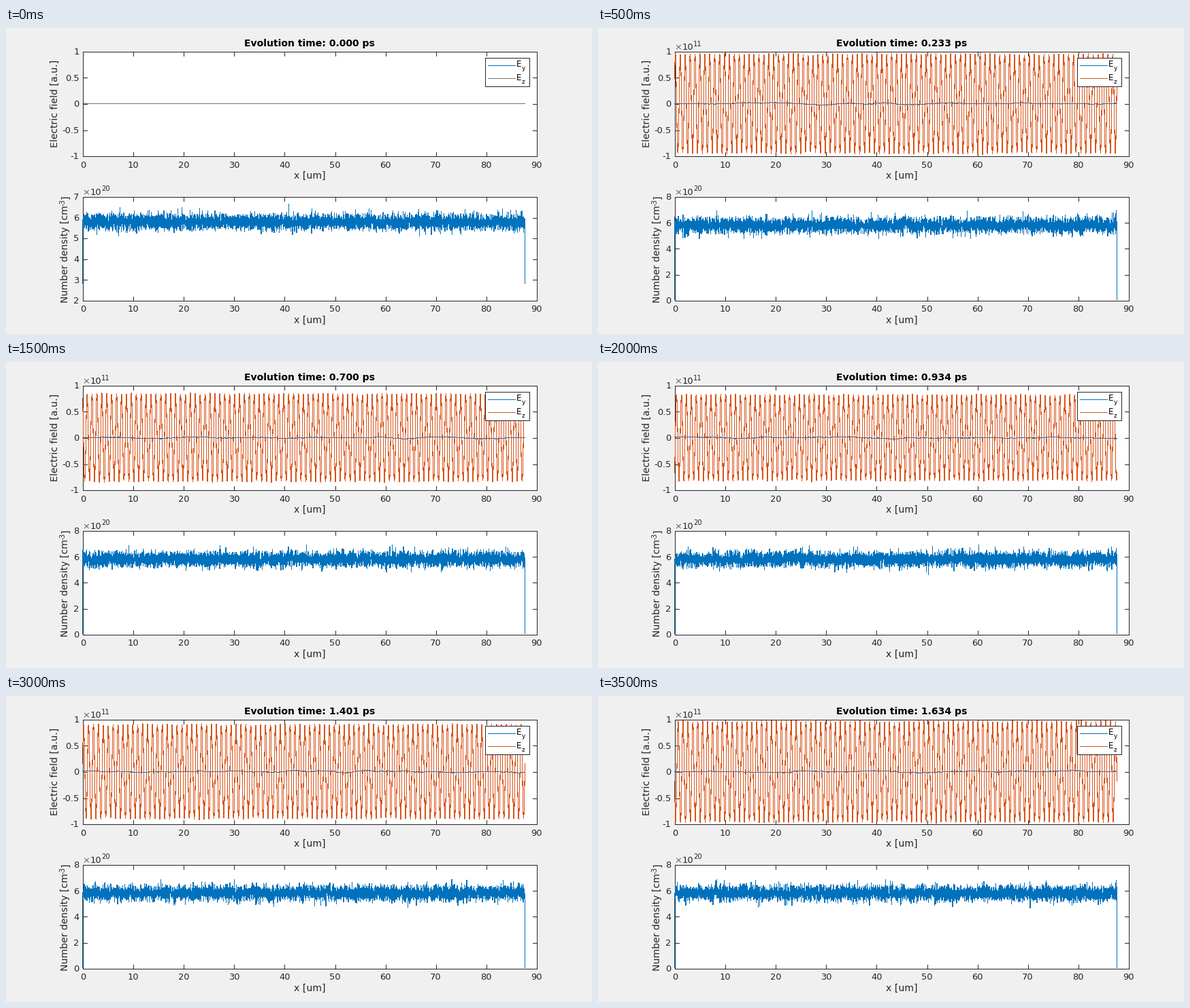
These frames come from a looping animation (861x451 px, 4000 ms). A matplotlib script:

```python
import numpy as np
import matplotlib.pyplot as plt
from matplotlib.animation import FuncAnimation
from matplotlib.patches import Rectangle

W, H, DPI = 861, 451, 64
PX = 72 / DPI                       # points per pixel
STEPS, STEP_PS = 8, 0.23345
LEFT, RIGHT, END = 112, 779, 762    # axes sides and last data column
UPPER, LOWER = (34, 188), (248, 401)
BLUE, ORANGE, GREY, INK = "#0072BD", "#D95319", "#757575", "#262626"
CYCLES, POINTS = 90, 6000
AMPLITUDE = [0, 0.95, 0.90, 0.84, 0.82, 0.84, 0.90, 0.965]
FIRST_PEAK = [0, 1.2, 4.3, 6.7, 2.9, 5.8, 1.6, 5.2]   # pixels from the left side

plt.rcParams["font.family"] = "DejaVu Sans"
plt.rcParams["path.simplify"] = False

fig = plt.figure(figsize=(W / DPI, H / DPI), dpi=DPI, facecolor="#F0F0F0")
ax = fig.add_axes([0, 0, 1, 1])
ax.set_xlim(-0.5, W - 0.5)
ax.set_ylim(H - 0.5, -0.5)
ax.axis("off")


def text(x, y, s, size=13, ha="left", color=INK, **kw):
    return ax.text(x, y, s, fontsize=size * PX, ha=ha, va="baseline",
                   color=color, **kw)


def line(x, y, color=INK, z=2):
    return ax.plot(x, y, color=color, lw=PX, antialiased=False, zorder=z,
                   solid_joinstyle="miter", solid_capstyle="projecting")[0]


def box(x0, y0, x1, y1, z):
    ax.add_patch(Rectangle((x0, y0), x1 - x0, y1 - y0, fc="white", ec=INK,
                           lw=PX, antialiased=False, zorder=z))


def vertical(x, y, s, size=14, ha="left"):
    text(x, y, s, size, ha, rotation=90, rotation_mode="anchor")


def power(y, exponent):
    return [text(112, y, "×", color="#666666"), text(122.7, y, "10"),
            text(139.3, y - 5.5, exponent, 10)]


def y_ticks(span, labels):
    parts = []
    for y, s in zip(np.linspace(span[1], span[0], len(labels)), labels):
        row = round(y)
        parts.append(text(107, y + 4.8, s, ha="right"))
        parts.append(line([LEFT, LEFT + 6], [row, row]))
        parts.append(line([RIGHT - 6, RIGHT], [row, row]))
    return parts


def panel(span):
    top, bottom = span
    box(LEFT, top, RIGHT, bottom, 1)
    for i in range(10):
        x = LEFT + (RIGHT - LEFT) * i / 9
        col = round(x)
        line([col, col], [top, top + 6])
        line([col, col], [bottom - 6, bottom])
        text(x + 0.3, bottom + 17, str(10 * i), ha="center")
    text(445.5, bottom + 33.5, "x [um]", 14, "center")


def legend():
    box(703, 43, 768, 85, 6)
    line([707, 747], [54, 54], BLUE, 7)
    for y, sub in ((56.5, "y"), (76.5, "z")):
        text(749.5, y, "E", 12, color="black", zorder=7)
        text(757.3, y + 4.5, sub, 9, color="black", zorder=7)
    return line([707, 747], [73, 73], ORANGE, 7)


def smooth(rng, width):
    """Unit-variance noise that varies over about `width` samples."""
    t = np.arange(-3 * width, 3 * width + 1)
    out = np.convolve(rng.standard_normal(POINTS),
                      np.exp(-(t / width) ** 2 / 2), "same")
    return out / out.std()


def rows(values, low, high, span):
    """Data values to whole pixel rows."""
    top, bottom = span
    y = bottom - (np.clip(values, low, high) - low) / (high - low) * (bottom - top)
    return np.round(y)


panel(UPPER)
panel(LOWER)
y_ticks(UPPER, ["-1", "-0.5", "0", "0.5", "1"])
start_ticks = y_ticks(LOWER, ["2", "3", "4", "5", "6", "7"])
later_ticks = y_ticks(LOWER, ["0", "2", "4", "6", "8"])
later_ticks += power(32, "11")
power(245.5, "20")
vertical(75, 111, "Electric field [a.u.]", ha="center")
vertical(91, 404.5, "Number density [cm")
vertical(86, 261.2, "-3", 10)
vertical(91, 251.2, "]")
title = text(445.5, 27, "", 14, "center", "black", weight="bold")

pos = np.linspace(0, END - LEFT, POINTS)
cols = np.round(LEFT + pos)
flat = np.zeros(POINTS)
ey = line(cols, flat, BLUE, 4)
ez = line(cols, flat, ORANGE, 5)
density = line(cols, flat, BLUE, 4)
ez_key = legend()


def draw(k):
    rng = np.random.default_rng(40 + k)
    started = k > 0
    title.set_text(f"Evolution time: {k * STEP_PS:.3f} ps")
    for part in start_ticks:
        part.set_visible(not started)
    for part in later_ticks:
        part.set_visible(started)

    phase = 2 * np.pi * CYCLES * (pos - FIRST_PEAK[k]) / (END - LEFT)
    wave = AMPLITUDE[k] * (1 + 0.01 * smooth(rng, 30)) * np.cos(phase)
    drift = started * (0.009 * smooth(rng, 100) + 0.003 * smooth(rng, 8))
    ez.set_ydata(rows(wave, -1, 1, UPPER))
    ey.set_ydata(rows(drift, -1, 1, UPPER))
    for part in (ez, ez_key):
        part.set_color(ORANGE if started else GREY)

    n = 5.8 + 0.3 * rng.standard_normal(POINTS) if started \
        else 5.78 + 0.195 * rng.standard_normal(POINTS)
    n[[0, -1]] = 0.05 if started else 2.82
    low, high = (0, 8) if started else (2, 7)
    density.set_ydata(rows(n, low, high, LOWER))
    return []


anim = FuncAnimation(fig, draw, frames=STEPS, interval=500, repeat=True,
                     repeat_delay=0, blit=False)
plt.show()
```
